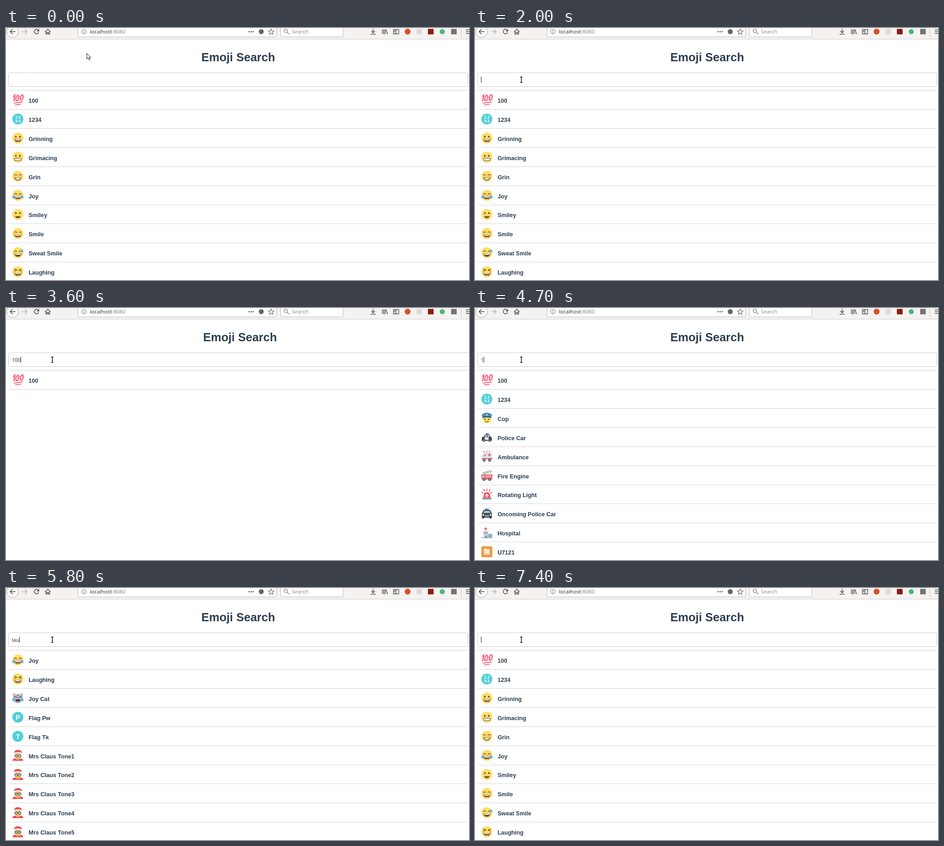
Recreate the animation shown at these times as an HTML page. Size 1014 px wide and 553 px high, loop 8000 ms.

```html
<!DOCTYPE html>
<html lang="en">
<head>
<meta charset="utf-8">
<title>Emoji Search</title>
<style>
  html, body { margin: 0; width: 100%; height: 100%; overflow: hidden; background: #fff; }
  svg { display: block; }
  .ui { font: 11.5px "Noto Sans", sans-serif; fill: #333; }
  .query { font: 11.2px "Noto Sans", sans-serif; fill: #333; }
  .title { font: bold 25.5px "Liberation Sans", Arial, sans-serif; fill: #2c3e50; text-anchor: middle; }
  .label { font: bold 12.67px "Liberation Sans", Arial, sans-serif; fill: #2c3e50; }
  .glyph { font-family: "Liberation Sans", Arial, sans-serif; font-weight: bold; fill: #fff; text-anchor: middle; }
  .line { fill: none; stroke: #4c4c4c; stroke-width: 1.5; }
</style>
</head>
<body>
<svg width="1014" height="553" viewBox="0 0 1014 553">
  <g id="toolbar">
    <rect width="1014" height="24" fill="#f4f3f1"/>
    <rect y="24" width="1014" height="1" fill="#cfcdcb"/>
    <circle cx="14.5" cy="8" r="13" fill="#fbfbfb" stroke="#a5a4a2"/>
    <path class="line" stroke-width="2" d="M21 8H9M14.500 2.500L9 8l5.500 5.500"/>
    <path class="line" style="stroke:#b9b8b6" d="M35 8H46M41 2.500L46.500 8L41 13.500"/>
    <path class="line" d="M70.500 4.500A5 5 0 1 0 71.500 9.500"/>
    <path d="M72.500 2v5.500H67z" fill="#4c4c4c"/>
    <path class="line" d="M85.500 8.500L91.500 2.500L97.500 8.500M87.500 8v5.500H90V9.500H93V13.500H95.500V8"/>
    <g fill="#fff" stroke="#bdbbb9">
      <rect x="157.500" y="-6.500" width="435" height="26" rx="2"/>
      <rect x="601.500" y="-6.500" width="136.500" height="26" rx="2"/>
    </g>
    <circle cx="170.500" cy="8" r="5" class="line" style="stroke-width:1;stroke:#666"/>
    <path class="line" style="stroke-width:1.200;stroke:#666" d="M170.500 7.500v3.500M170.500 5v1.300"/>
    <text class="ui" x="183.500" y="12.300">localhost<tspan fill="#858585">:8080</tspan></text>
    <g fill="#666"><circle cx="532.500" cy="8" r="1.600"/><circle cx="537" cy="8" r="1.600"/><circle cx="541.500" cy="8" r="1.600"/></g>
    <circle cx="559" cy="8" r="5.500" fill="#666"/>
    <path class="line" style="stroke:#666;stroke-width:1.200" d="M581 2l1.800 4 4.400.4-3.300 3 1 4.300-3.900-2.300-3.900 2.300 1-4.300-3.300-3 4.400-.4z"/>
    <path class="line" style="stroke:#8a8a8a" d="M615.500 9l5 5M616.500 6.200a3.700 3.700 0 1 1-7.400 0a3.700 3.700 0 1 1 7.400 0"/>
    <text class="ui" x="626" y="12.300" style="fill:#929292">Search</text>
    <path class="line" d="M804 2v8M800 6.500l4 4 4-4M798.500 13.500h11"/>
    <path class="line" d="M824.500 3v10.500M827.500 3v10.500M830.500 3v10.500M832 3l3.500 10.500"/>
    <path class="line" style="stroke-width:1.300" d="M848.500 3.500h11.500v9.500h-11.500zM854 3.500v9.500M850 6h2.500M850 8.500h2.500"/>
    <circle cx="879.500" cy="8" r="6.500" fill="#d9512c"/>
    <rect x="899" y="2" width="12" height="12" fill="#dddcda"/>
    <rect x="924" y="2" width="12.500" height="12" fill="#8f1d12"/>
    <circle cx="955.500" cy="8" r="5.500" fill="#41b883"/>
    <rect x="975" y="2" width="12" height="12" fill="#747474"/>
    <rect x="996" y="0" width="1" height="20" fill="#d2d0ce"/>
    <path class="line" d="M1007 4h9M1007 8h9M1007 12h9"/>
  </g>
  <text class="title" id="title" y="73.300">Emoji Search</text>
  <rect id="field" x="5.500" y="98" height="30.500" rx="3" fill="#fff" stroke="#ccc"/>
  <text class="query" id="query" x="12.700" y="117.500"></text>
  <rect id="caret" y="107" width="1" height="13" fill="#222"/>
  <g id="list"></g>
  <path id="arrow" d="M0 0V12.500L3 9.800L5.300 15L7.300 14L5 9.200H8.800Z" fill="#fff" stroke="#111"/>
  <g id="beam" fill="none">
    <path d="M-2.500 -6H2.500M-2.500 6H2.500M0 -6V6" stroke="#fff" stroke-width="3"/>
    <path d="M-2.500 -6H-.8L0 -5L.8 -6H2.500M-2.500 6H-.8L0 5L.8 6H2.500M0 -5V5" stroke="#111" stroke-width="1.500"/>
  </g>
</svg>
<script>
const DARK = '#664e27', TEAL = '#4fd0d9', RED = '#ed4c5c', BLUE = '#4a8bd0', STEEL = '#3e4347';

// Icons are drawn around 0,0 in a box of 24 pixels.
const fill = (color, d) => `<path fill="${color}" d="${d}"/>`;
const stroke = (color, width, d) => `<path fill="none" stroke="${color}" stroke-width="${width}" stroke-linecap="round" d="${d}"/>`;
const disc = (color, x, y, rx, ry = rx) => `<ellipse cx="${x}" cy="${y}" rx="${rx}" ry="${ry}" fill="${color}"/>`;
const box = (color, x, y, w, h, r = 0) => `<rect x="${x}" y="${y}" width="${w}" height="${h}" rx="${r}" fill="${color}"/>`;
const glyph = (text, size, x, y) => `<text class="glyph" font-size="${size}" x="${x}" y="${y}">${text}</text>`;

const face = features => disc('#ffdd67', 0, 0, 12) + features;
const openEyes = disc(DARK, -4.5, -3, 1.8, 2) + disc(DARK, 4.5, -3, 1.8, 2);
const happyEyes = stroke(DARK, 1.4, 'M-7.500-2Q-5-6.500-2.500-2M2.500-2Q5-6.500 7.500-2');
const shutEyes = stroke(DARK, 1.5, 'M-7.500-6L-2.500-3.500L-7.500-1.500M7.500-6L2.500-3.500L7.500-1.500');
const mouth = fill(DARK, 'M-7.500 1.500Q0 2.500 7.500 1.500Q7 9 0 9Q-7 9-7.500 1.500Z');
const teeth = fill('#fff', 'M-6 2.200Q0 3 6 2.200L5.500 4.700H-5.500Z');
const tongue = disc('#ff717f', 0, 7.6, 3, 1.2);
const grid = box(DARK, -8, 1.5, 16, 6.8, 3.2) + box('#fff', -7, 2.5, 14, 4.8, 2.3)
  + stroke('#b9aa90', .6, 'M-7 4.900H7M-3.500 2.500V7.300M0 2.500V7.300M3.500 2.500V7.300');
const tears = fill('#65b1ef', 'M-6 1Q-12-1-12.500 4Q-12 8-8.500 7Q-6 5-6 1ZM6 1Q12-1 12.500 4Q12 8 8.500 7Q6 5 6 1Z');
const drop = fill('#65b1ef', 'M9.500-8Q6.500-3.500 7-2Q9.500 1.500 12-2Q12.500-3.500 9.500-8Z');
const letter = text => disc(TEAL, 0, 0, 12) + glyph(text, 15, 0, 5.3);
const wheels = y => [-6, 6].map(x => disc(STEEL, x, y, 3) + disc('#cbd2d6', x, y, 1.3)).join('');
const flashes = stroke(RED, 1.3, 'M-5-8.500L-7-11.500M0-9V-12M5-8.500L7-11.500');
const clock = hands => disc('#627b8a', 0, 0, 12) + disc('#fff', 0, 0, 9.5) + stroke(STEEL, 1.6, hands);

const mrsClaus = disc('#e8edf0', 0, 0, 9.5, 9) + fill(RED, 'M-12 12Q-11 6-5 7H5Q11 6 12 12Z')
  + disc('#ffdd67', 0, 2, 7, 7.5) + fill(RED, 'M-9-4Q-8-13 2-12Q9-11 9-4Z')
  + stroke('#fff', 2.5, 'M-8-4.500Q0-7.500 8-4.500') + disc('#fff', 10, -3, 2)
  + [-3.5, 3.5].map(x => disc(STEEL, x, 1, 3.4) + disc('#fff', x, 1, 2.2) + disc(DARK, x, 1, 1)).join('')
  + stroke(RED, 1.2, 'M-2.500 6.500Q0 8 2.500 6.500');

const icons = {
  '100': `<g transform="skewX(-10)" fill="none" stroke="#ff5a79" stroke-width="2.600" stroke-linecap="round">
    <path d="M-11-8L-8.500-10.500V2.500"/><ellipse cx="-2" cy="-4" rx="3" ry="6"/><ellipse cx="7.500" cy="-5" rx="3" ry="6"/>
    <path d="M-7 7L11 4.500M-3 11L7 9.500" stroke-width="2"/></g>`,
  '1234': disc(TEAL, 0, 0, 12) + glyph('1', 9, -3.6, -1) + glyph('2', 9, 3.6, -1) + glyph('3', 9, -3.6, 7.5) + glyph('4', 9, 3.6, 7.5),
  Grinning: face(openEyes + mouth + teeth + tongue),
  Grimacing: face(openEyes + grid),
  Grin: face(happyEyes + mouth + fill('#fff', 'M-6 2.500Q0 3.300 6 2.500Q5 7.500 0 7.700Q-5 7.500-6 2.500Z') + stroke(DARK, .6, 'M-6 5H6')),
  Joy: face(happyEyes + mouth + teeth + tongue + tears),
  Smiley: face(openEyes + fill(DARK, 'M-6 3Q0 5 6 3Q5 8 0 8Q-5 8-6 3Z')),
  Smile: face(happyEyes + mouth + teeth + tongue),
  'Sweat Smile': face(happyEyes + mouth + teeth + drop),
  Laughing: face(shutEyes + mouth + teeth + tongue),
  Cop: disc(DARK, 0, 0, 9.5, 6) + disc('#ffdd67', 0, 2.5, 9.5, 9) + disc(DARK, -3.7, 2.5, 1.4, 1.6) + disc(DARK, 3.7, 2.5, 1.4, 1.6)
    + stroke(DARK, 1.2, 'M-3.500 7.500Q0 9 3.500 7.500') + fill(BLUE, 'M-11.500-7Q0-17 11.500-7L9-1Q0-4-9-1Z')
    + fill('#2b5d94', 'M-9.500-3Q0-6 9.500-3L9 0Q0-3-9 0Z') + disc('#ffce31', 0, -7, 2),
  'Police Car': box(RED, -2, -9, 3, 3) + box('#42ade2', 1, -9, 3, 3) + fill(STEEL, 'M-11 8V0L-7-1L-4-6H5L9 0L11 2V8Z')
    + fill('#c1e4ee', 'M-5-1L-3-4.500H0V-1ZM1.500-1V-4.500H4.500L7-1Z') + box('#e8edf0', -5, 0, 9, 6) + wheels(7),
  Ambulance: flashes + fill('#dfe5e9', 'M-11 9V-1L-5-8H12V9Z') + fill('#9bb9c7', 'M-9 0L-5-5H-2V0Z')
    + box(RED, -11, 4, 23, 2) + stroke(RED, 1.8, 'M3-3H8M5.500-5.500V-.500') + wheels(8.5),
  'Fire Engine': stroke('#94989b', 1.2, 'M-9-6L10-11M-8-3L11-8M-5-7L-4-4M0-8.500L1-5.500M5-10L6-7')
    + box(RED, -12, -2, 24, 11, 1) + box('#c1e4ee', -10, 0, 5, 4) + box('#f3c5c9', -3, 0, 13, 3) + stroke('#fff', 1, 'M-12 5.500H12') + wheels(9),
  'Rotating Light': stroke(RED, 1.7, 'M-11-5L-8-3M-7-11L-5-7M0-12V-8M7-11L5-7M11-5L8-3')
    + fill(RED, 'M-8 7L-6-3Q0-7 6-3L8 7Z') + disc('#fff', 0, 2, 3) + stroke('#ffb9c0', 1, 'M-5 2H5M0-3V7M-3.500-1.500L3.500 5.500M3.500-1.500L-3.500 5.500')
    + box('#94989b', -10, 7, 20, 4, 1),
  'Oncoming Police Car': box(RED, -4, -11, 4, 3) + box('#42ade2', 0, -11, 4, 3) + fill(STEEL, 'M-11 9V0L-7-8H7L11 0V9Z')
    + fill('#8bc9e0', 'M-8-1L-5.500-6H5.500L8-1Z') + box('#94989b', -5, 3, 10, 4, 1) + disc('#ffe9a0', -8, 3, 2) + disc('#ffe9a0', 8, 3, 2)
    + box(STEEL, -10, 8, 4, 3) + box(STEEL, 6, 8, 4, 3),
  Hospital: box('#dbe3e8', -8, -4, 11, 15) + box('#c2d0d8', 1, 2, 11, 9) + stroke(RED, 2, 'M-2.500-11V-6M-5-8.500H0')
    + stroke('#5d91b0', 1.5, 'M-6-1H1M-6 2H1M3 5H11M3 8H11') + box('#5d91b0', -4, 6, 4, 5) + box('#94989b', -12, 10.5, 24, 1.5),
  U7121: box('#eb9a40', -12, -12, 24, 24, 3)
    + '<text x="0" y="5.500" font-size="15" font-weight="bold" fill="#fff" text-anchor="middle" font-family="Noto Sans CJK JP, Noto Sans CJK, sans-serif">無</text>',
  'Joy Cat': fill('#c3cbd0', 'M-11-11Q-5-11-3-7H3Q5-11 11-11L11 0Q11 11 0 11.500Q-11 11-11 0Z')
    + fill('#f29aaa', 'M-9.500-9Q-6-9-5-6L-9-3ZM9.500-9Q6-9 5-6L9-3Z') + stroke('#71797e', 1.3, 'M-2-8V-5M0-8V-4M2-8V-5')
    + stroke(STEEL, 1.5, 'M-8-1Q-5-5-2-1M2-1Q5-5 8-1') + fill(STEEL, 'M-6 3Q0 2 6 3Q5 9 0 9.500Q-5 9-6 3Z') + tongue + tears + disc('#e78998', 0, 1.5, 1.5, 1),
  'Flag Pw': letter('P'),
  'Flag Tk': letter('T'),
  Rofl: `<g transform="translate(2.500 0) rotate(80) scale(.82)">${face(shutEyes + mouth + teeth)}</g>`
    + fill('#65b1ef', 'M-9-7Q-5-12-4-9Q-4-4-10-3Z') + stroke('#3e75ad', 2, 'M-11 0L-5-8') + fill('#4a8bd0', 'M-11 6L-7 4L-4 10L-9 11Z'),
  Clock10: clock('M0 0V-7M0 0L-4-2.500'),
  Clock1030: clock('M0 0V7M0 0L-3.500-3'),
};

const names = text => text.split(',');
const all = names('100,1234,Grinning,Grimacing,Grin,Joy,Smiley,Smile,Sweat Smile,Laughing');
const one = names('100,1234,Cop,Police Car,Ambulance,Fire Engine,Rotating Light,Oncoming Police Car,Hospital,U7121');
const ten = names('100,Clock10,Clock1030');
const hundred = ['100'];
const lau = names('Joy,Laughing,Joy Cat,Flag Pw,Flag Tk').concat([1, 2, 3, 4, 5].map(n => 'Mrs Claus Tone' + n));
const laugh = names('Joy,Laughing,Joy Cat,Rofl');

// Start time, typed text, rows shown
const states = [
  [0, '', all], [2000, '', all], [3200, '1', all], [3300, '1', one], [3500, '10', ten], [3600, '100', hundred],
  [4400, '10', hundred], [4500, '10', ten], [4700, '1', one], [4800, '', all],
  [5600, 'l', all], [5700, 'la', lau], [5800, 'lau', lau], [5900, 'laug', laugh], [6000, 'laugh', laugh],
  [6800, 'laug', laugh], [7300, 'lau', lau], [7400, '', all],
];

const el = id => document.getElementById(id);
const set = (id, name, value) => el(id).setAttribute(name, value);

function row(name, i, width) {
  const top = 136.6 + 41.9 * i;
  const icon = name.startsWith('Mrs') ? mrsClaus : icons[name];
  return box('#d6d6d6', 5, Math.floor(top + 41.9), width, 1)
    + `<g transform="translate(26 ${top + 21.2})">${icon}</g><text class="label" x="49.400" y="${top + 27.4}">${name}</text>`;
}

let shown;
function showState(state) {
  if (state === shown) return;
  shown = state;
  const [start, text, rows] = state;
  const width = rows.length > 9 ? 1007 : 1015; // a long list brings in the scrollbar
  set('title', 'x', 5 + width / 2);
  set('field', 'width', width - 1);
  el('query').textContent = text;
  set('caret', 'x', Math.round(12.7 + el('query').getComputedTextLength()));
  set('caret', 'visibility', start ? 'visible' : 'hidden');
  el('list').innerHTML = box('#d6d6d6', 5, 136, width, 1) + rows.map((name, i) => row(name, i, width)).join('');
}

function showPointer(time) {
  const step = Math.min(5, Math.max(0, Math.floor(time / 100) - 4)) / 5;
  const x = 177 - 75.5 * step, y = 55.5 + 58 * step;
  const overField = y > 98;
  set('arrow', 'visibility', overField ? 'hidden' : 'visible');
  set('beam', 'visibility', overField ? 'visible' : 'hidden');
  for (const id of ['arrow', 'beam']) set(id, 'transform', `translate(${x} ${y})`);
}

function draw() {
  const time = performance.now() % 8000;
  showState(states.findLast(([start]) => start <= time));
  showPointer(time);
  requestAnimationFrame(draw);
}
draw();
</script>
</body>
</html>
```
